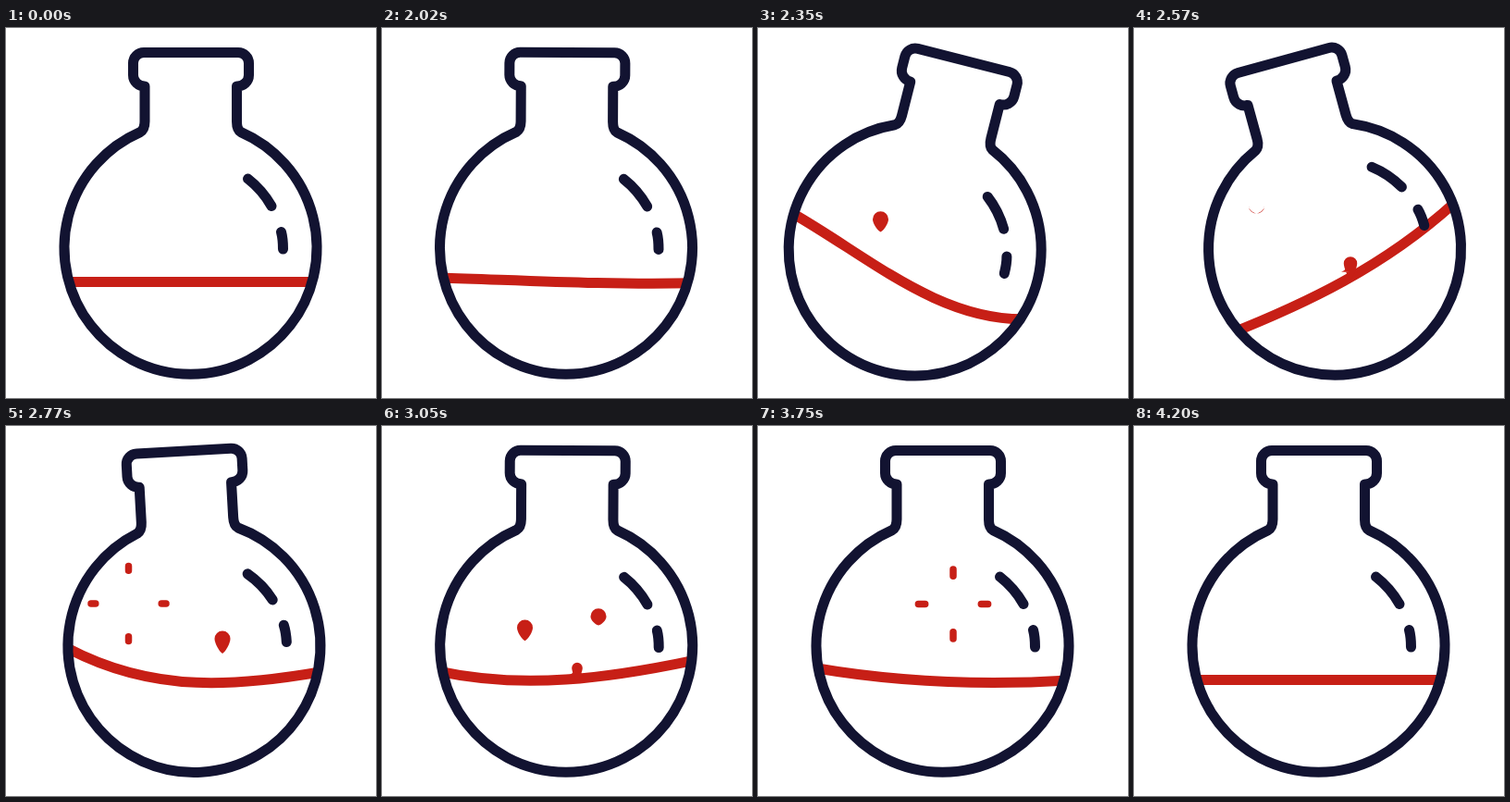
These frames come from a looping animation (400x400 px, 4220 ms). An HTML page:

```html
<!DOCTYPE html>
<html lang="en">
<head>
<meta charset="utf-8">
<title>Flask</title>
<style>
  html, body { margin: 0; width: 100%; height: 100%; overflow: hidden; background: #fff; }
  svg { display: block; width: 100%; height: 100%; }
  path { fill: none; }
  .ink { stroke: #121331; stroke-width: 11; stroke-linecap: round; stroke-linejoin: round; }
  .liquid { stroke: #c71f16; stroke-width: 11; }
  .drop { fill: #c71f16; }
  .burst { stroke: #c71f16; stroke-width: 7.5; stroke-linecap: round; }
</style>
</head>
<body>
<svg viewBox="0 0 400 400">
  <clipPath id="bowl"><circle cx="199.5" cy="237.5" r="136"/></clipPath>
  <g id="flask">
    <g clip-path="url(#bowl)"><path id="liquid" class="liquid"/></g>
    <path class="ink" d="M145 112.6 A136.5 136.5 0 1 0 254 112.6 C250.5 110.5 249.5 107 249.5 101 V63
      A12.5 12 0 0 0 262.5 51 V38 a11.5 11.5 0 0 0 -11.5 -11.5 H149 a11.5 11.5 0 0 0 -11.5 11.5 V51
      A12.5 12 0 0 0 150 63 V101 C150 107 148.5 110.5 145 112.6 Z"/>
    <path class="ink" d="M261.5 163 Q277 175 287 192.5 M297.5 220.5 Q299.5 228 299.5 239"/>
  </g>
  <g id="drops"></g>
</svg>
<script>
const LOOP = 4220, BURST = 246, REACH = 46, R = 8.5;
const CX = 199.5, CY = 237.5, LEVEL = 274.5;

// time, then shift x and tilt in degrees
const swing = [
  [2000, 0, 0], [2285, -36, 18.2], [2583, 17.7, -15.5], [2875, -1.5, 1.6], [3120, 0, 0]
];

// time, then height offsets of the four control points of the surface
const waves = [
  [2000, 0, 0, 0, 0], [2330, -43, -17, 33, 7], [2570, 22, 12, -4, -50],
  [2785, -43, 12.7, 9.2, -1], [3190, 4, 10, -6, -29], [3620, -24, 2, 12, 4],
  [3920, 4, 4, -3, -5], [4200, 0, 0, 0, 0]
];

const drops = [
  { x: 132.5, from: 266, to: 192, start: 2030, end: 2610, pow: 2 },
  { x: 234, from: 261.5, to: 201.5, start: 2520, end: 3160, pow: 1.5 },
  { x: 154.5, from: 270, to: 192.5, start: 2790, end: 3290, pow: 1.5 },
  { x: 211, from: 268, to: 192.5, start: 3010, end: 3610, pow: 1.25 }
];

const el = id => document.getElementById(id);
const clamp = u => Math.min(1, Math.max(0, u));
const mix = (a, b, u) => a + (b - a) * u;
const sine = u => (1 - Math.cos(Math.PI * u)) / 2;
const smooth = u => u * u * (3 - 2 * u);
const launch = u => u * (1.5 - u * u / 2);

function sample(keys, t, firstEase = sine) {
  if (t <= keys[0][0]) return keys[0].slice(1);
  const i = keys.findIndex(k => k[0] > t);
  if (i < 0) return keys[keys.length - 1].slice(1);
  const a = keys[i - 1], b = keys[i];
  const u = (t - a[0]) / (b[0] - a[0]);
  const e = i === 1 ? firstEase(u) : sine(u);
  return a.slice(1).map((v, n) => mix(v, b[n + 1], e));
}

function addPath(cls) {
  const p = document.createElementNS("http://www.w3.org/2000/svg", "path");
  p.setAttribute("class", cls);
  return el("drops").appendChild(p);
}
for (const d of drops) {
  d.body = addPath("drop");
  d.rays = addPath("burst");
}

// round head with a tail that shortens as the drop slows
function dropShape(d, t) {
  if (t < d.start || t >= d.end) return "";
  const u = (t - d.start) / (d.end - d.start);
  const y = mix(d.to, d.from, Math.pow(1 - u, d.pow));
  const r = R * clamp((t - d.start) / 60);
  const tail = r + 14 * Math.max(0, 0.93 - u) * r / R;
  const k = r * 0.9;
  let s = `M${d.x - r} ${y} A${r} ${r} 0 0 1 ${d.x + r} ${y} ` +
    `C${d.x + r} ${y + k * 0.6} ${d.x + r * 0.45} ${y + tail * 0.85} ${d.x} ${y + tail} ` +
    `C${d.x - r * 0.45} ${y + tail * 0.85} ${d.x - r} ${y + k * 0.6} ${d.x - r} ${y} Z`;
  if (u > 0.85) s += `M${d.x - r} ${y} a${r} ${r} 0 1 0 ${2 * r} 0 a${r} ${r} 0 1 0 ${-2 * r} 0 Z`;
  if (u < 0.12) {
    const b = d.from + 4;
    s += `M${d.x - 10} ${b - 2} Q${d.x - 3} ${b - 4} ${d.x - 4} ${y} H${d.x + 4} ` +
      `Q${d.x + 3} ${b - 4} ${d.x + 8} ${b - 1} Z`;
  }
  return s;
}

function burstShape(d, t) {
  const u = (t - d.end) / BURST;
  if (u < 0 || u > 1) return "";
  const outer = REACH * (1 - (1 - u) ** 2);
  const inner = Math.min(outer - 0.01, REACH * smooth(clamp(u * 1.06)));
  return [[0, -1], [1, 0], [0, 1], [-1, 0]].map(([x, y]) =>
    `M${d.x + x * inner} ${d.to + y * inner} L${d.x + x * outer} ${d.to + y * outer}`).join("");
}

function draw(t) {
  const [shift, tilt] = sample(swing, t);
  const drop = Math.abs(shift) * 0.06;
  el("flask").setAttribute("transform", `translate(${shift} ${drop}) rotate(${tilt} ${CX} ${CY})`);

  const pts = sample(waves, t, launch).map((v, i) => `${CX - 137 + i * 274 / 3} ${LEVEL + v}`);
  el("liquid").setAttribute("d", `M${pts[0]} C${pts.slice(1).join(" ")}`);

  for (const d of drops) {
    d.body.setAttribute("d", dropShape(d, t));
    d.rays.setAttribute("d", burstShape(d, t));
  }
}

function frame() {
  draw(performance.now() % LOOP);
  requestAnimationFrame(frame);
}
frame();
</script>
</body>
</html>
```
